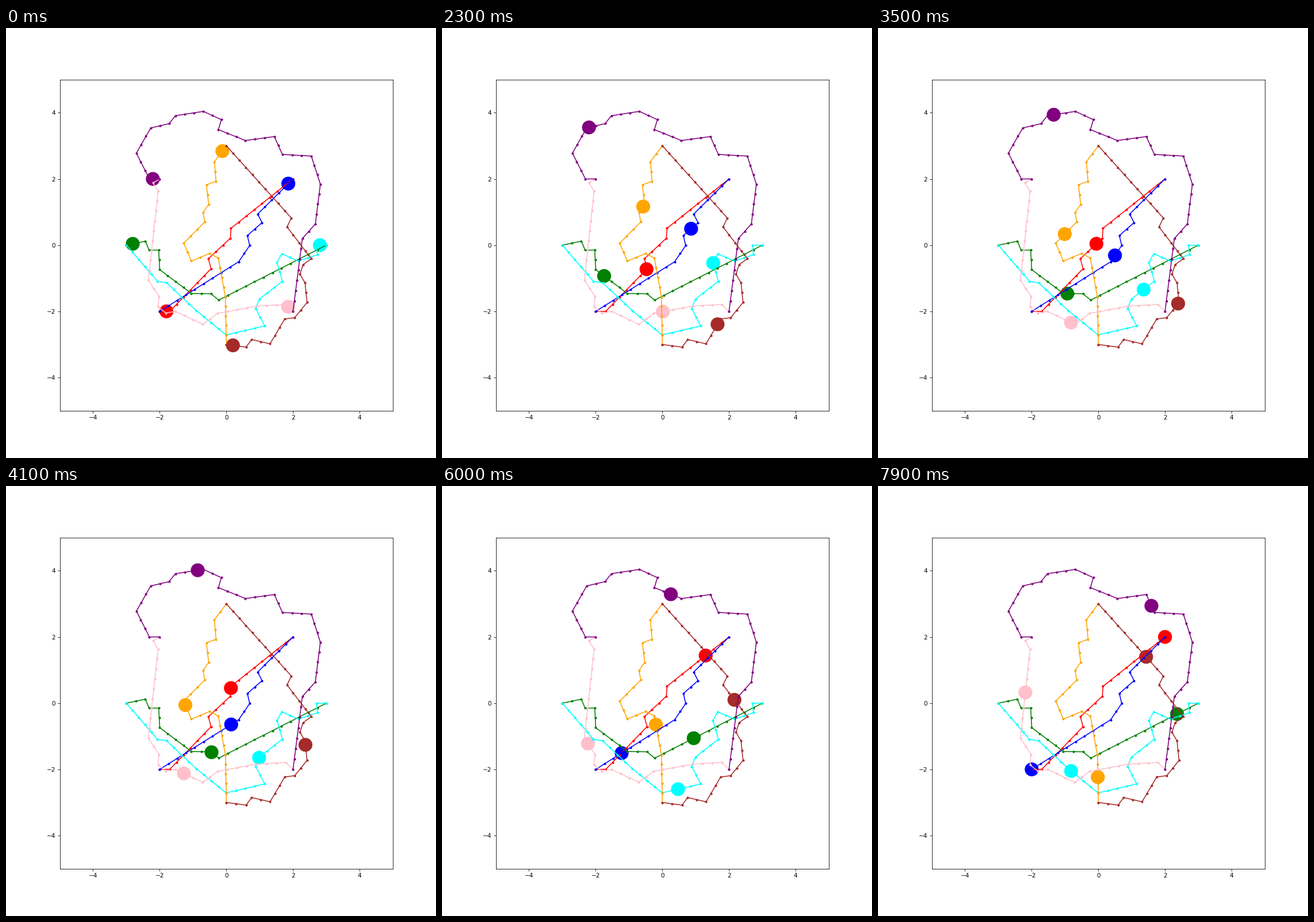
A matplotlib script for the animation above (8000 ms loop, 748 px wide and 748 px high).

```python
import numpy as np
import matplotlib.pyplot as plt
from matplotlib.animation import FuncAnimation
from matplotlib.patches import Circle

STEP = 0.3           # spacing of the waypoints, in axis units
HEAD_START = 2 / 3   # waypoints already covered when the loop begins
FRAMES = 80

fig, ax = plt.subplots(figsize=(10, 10), dpi=74.8)
ax.set_xlim(-5, 5)
ax.set_ylim(-5, 5)
robots = []


def waypoints(corners):
    """Cut each leg between two corners into equal pieces close to STEP."""
    points = [corners[:1]]
    for a, b in zip(corners, corners[1:]):
        n = max(1, round(np.hypot(*(b - a)) / STEP))
        points.append(np.linspace(a, b, n + 1)[1:])
    return np.vstack(points)


def add_robot(color, pace, *corners):
    """pace: waypoints passed per frame."""
    path = waypoints(np.array(corners, float))
    ax.plot(path[:, 0], path[:, 1], color=color, marker='o', markersize=3)
    ball = ax.add_patch(Circle(corners[0], 0.2, color=color))
    robots.append((ball, path, pace))


add_robot('red', .272, (-2, -2), (-1.7, -2), (-.46, -.71), (-.54, -.41),
          (.12, .21), (.14, .51), (2, 2))
add_robot('blue', .273, (2, 2), (.94, .94), (1.07, .68), (.63, .29),
          (.7, -.01), (.37, -.5), (-2, -2))
add_robot('green', .278, (-3, 0), (-2.43, .12), (-2.32, -.15), (-2.03, -.15),
          (-2, -.74), (-1.05, -1.46), (-.46, -1.47), (-.23, -1.66), (3, 0))
add_robot('cyan', .278, (3, 0), (2.71, 0), (2.73, -.29), (2.16, -.48),
          (1.66, -.26), (1.52, -.52), (1.68, -1.09), (.99, -1.63), (.88, -1.91),
          (1.15, -2.44), (-.01, -2.71), (-.9, -1.98), (-1.79, -1.14),
          (-2.07, -1.09), (-3, 0))
add_robot('orange', .287, (0, 3), (-.36, 2.52), (-.31, 1.93), (-.6, 1.82),
          (-.53, 1.23), (-.7, .99), (-.65, .7), (-1.28, .06), (-1.05, -.48),
          (-.5, -.25), (-.24, -.39), (-.03, -1.56), (0, -3))
add_robot('brown', .291, (0, -3), (.59, -3.08), (.76, -2.85), (1.31, -2.98),
          (1.75, -2.23), (2.05, -2.19), (2.42, -1.73), (2.36, -1.14), (2.21, -.88),
          (2.3, -.59), (2.55, -.41), (1.82, .55), (1.95, .82), (0, 3))
add_robot('pink', .278, (2, -2), (1.78, -1.79), (.91, -1.84), (-.26, -2.06),
          (-.71, -2.39), (-1.53, -2), (-1.82, -2.05), (-2.05, -1.86),
          (-2.02, -1.55), (-2.34, -1.06), (-2.05, 1.63), (-2.2, 1.88), (-2, 2))
add_robot('purple', .286, (-2, 2), (-2.31, 2), (-2.7, 2.78), (-2.27, 3.54),
          (-1.72, 3.67), (-1.53, 3.91), (-.69, 4.04), (-.15, 3.79), (-.24, 3.49),
          (.57, 3.16), (1.44, 3.28), (1.68, 2.74), (2.55, 2.69), (2.82, 1.84),
          (2.67, .64), (2.28, .2), (2, -2))


def update(i):
    for ball, path, pace in robots:
        t = HEAD_START + pace * i
        idx = np.arange(len(path))
        ball.center = np.interp(t, idx, path[:, 0]), np.interp(t, idx, path[:, 1])
    return [robot[0] for robot in robots]


anim = FuncAnimation(fig, update, frames=FRAMES, interval=100, repeat=True, repeat_delay=0)
plt.show()
```
